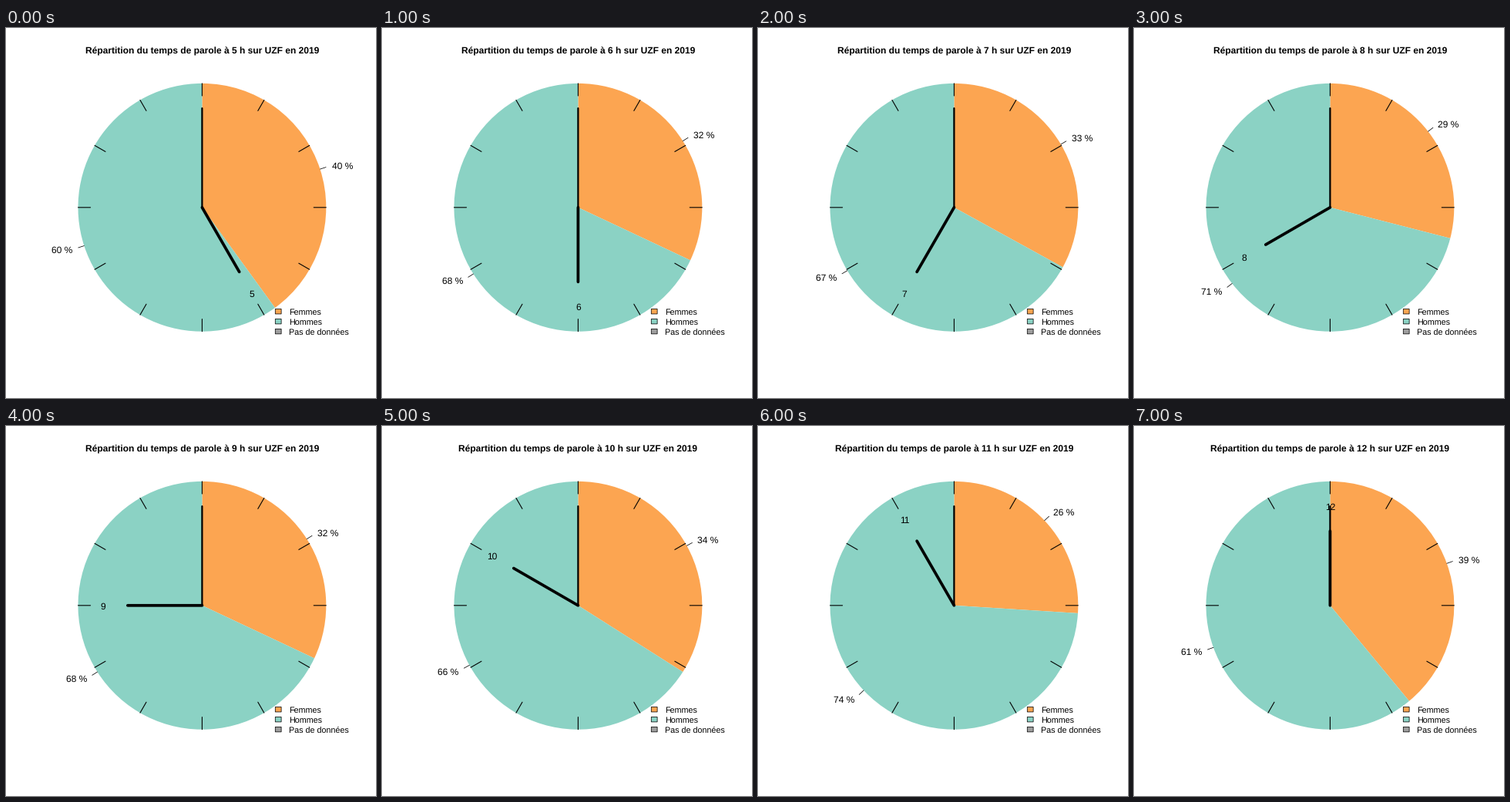
A matplotlib script that plays this animation: 480 by 480 pixels, repeating every 8 s.

```python
import numpy as np
import matplotlib.pyplot as plt
from matplotlib.animation import FuncAnimation
from matplotlib.patches import Rectangle, Wedge

plt.rcParams["font.family"] = "Liberation Sans"
plt.rcParams["text.hinting"] = "none"
plt.rcParams["path.snap"] = False

SIZE, DPI = 480, 72  # one point equals one pixel
CX, CY, R = 254.4, 232.8, 160.9
WOMEN, MEN, NO_DATA = "#fca551", "#8bd2c4", "#9e9e9e"
FIRST_HOUR = 5
SHARES = [40, 32, 33, 29, 32, 34, 26, 39]  # women's share per hour, in %
LEGEND = [("Femmes", WOMEN), ("Hommes", MEN), ("Pas de données", NO_DATA)]

fig = plt.figure(figsize=(SIZE / DPI, SIZE / DPI), dpi=DPI, facecolor="white")
ax = fig.add_axes([0, 0, 1, 1])


def polar(turn, r):
    """Point at a clockwise fraction of a turn from the top."""
    a = 2 * np.pi * turn
    return CX + R * r * np.sin(a), CY - R * r * np.cos(a)


def ray(turn, r0, r1, width):
    (x0, y0), (x1, y1) = polar(turn, r0), polar(turn, r1)
    ax.plot([x0, x1], [y0, y1], color="black", lw=width,
            solid_capstyle="round")


def text(x, y, s, size=12, ha="left", weight="normal"):
    ax.text(x, y, s, fontsize=size, ha=ha, va="baseline", weight=weight)


def sector(start, end, color):
    # The y axis points down, so angles grow clockwise.
    ax.add_patch(Wedge((CX, CY), R, 360 * start - 90, 360 * end - 90,
                       facecolor=color, lw=0))


def share_label(turn, percent):
    ray(turn, 1, 1.05, 0.75)
    x, y = polar(turn, 1.1)
    text(x, y + 4.6, f"{percent} %", ha="left" if x > CX else "right")


def draw_legend():
    for row, (name, color) in enumerate(LEGEND):
        y = 367.7 + 12.96 * row
        ax.add_patch(Rectangle((349.3, y - 3.24), 7.8, 6.48, facecolor=color,
                               edgecolor="black", lw=0.75))
        text(366.7, y + 4.3, name, size=10.8)


def draw(i):
    ax.clear()
    ax.set(xlim=(0, SIZE), ylim=(SIZE, 0))
    ax.axis("off")
    hour, women = FIRST_HOUR + i, SHARES[i]
    split = women / 100

    sector(0, split, WOMEN)
    sector(split, 1, MEN)
    share_label(split / 2, women)
    share_label((1 + split) / 2, 100 - women)

    for k in range(12):
        ray(k / 12, 0.9, 1, 1.1)
    ray(0, 0, 0.8, 2.25)
    ray(hour / 12, 0, 0.6, 3.75)
    x, y = polar(hour / 12, 0.8)
    text(x, y + 4.6, str(hour), ha="center")

    draw_legend()
    text(CX, 34, f"Répartition du temps de parole à {hour} h sur UZF en 2019",
         ha="center", weight="bold")
    return []


anim = FuncAnimation(fig, draw, frames=len(SHARES), interval=1000,
                     init_func=lambda: draw(0), repeat=True, repeat_delay=0)
plt.show()
```
